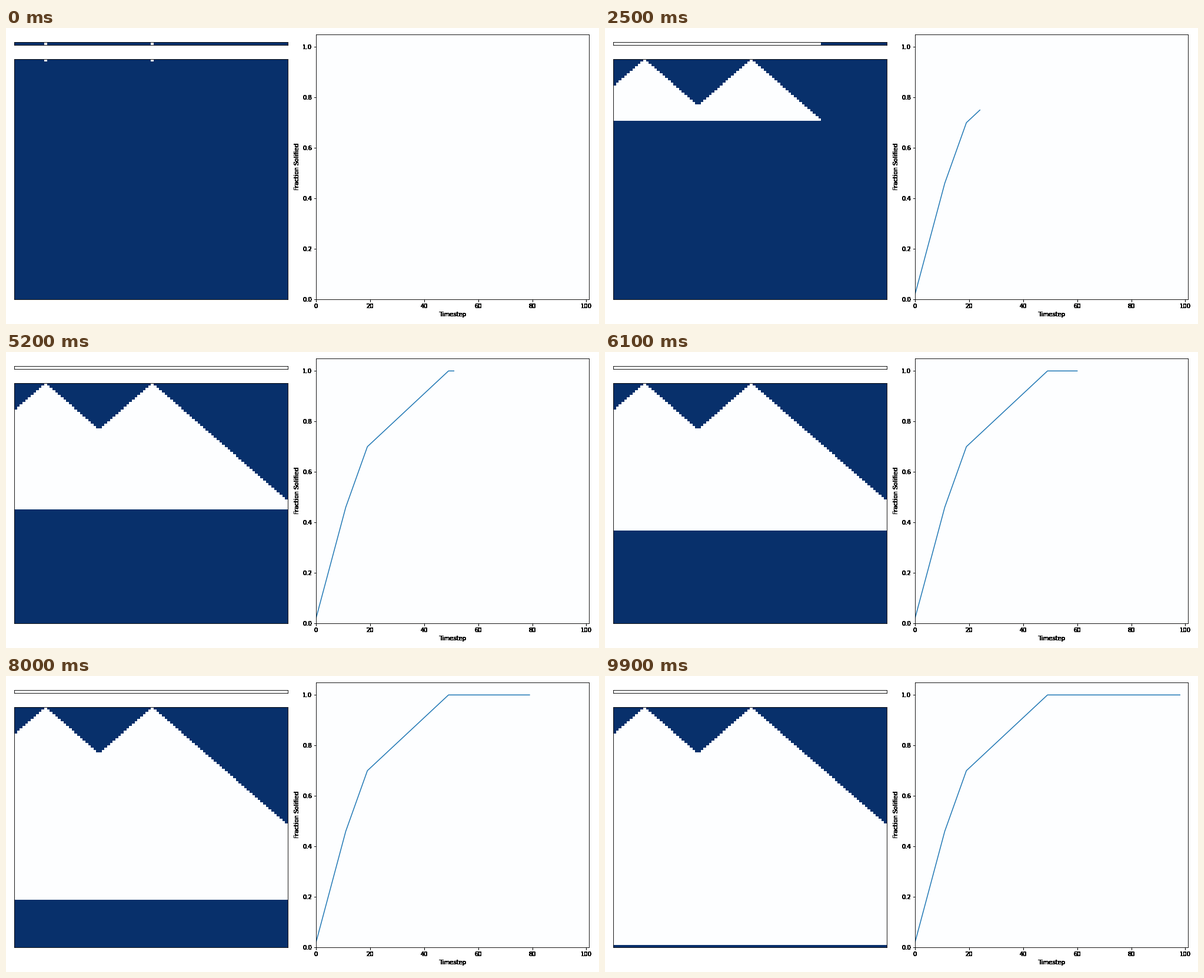
Animation, 1008 px wide and 504 px high, one loop 10 s. Source, as a matplotlib script:

```python
import numpy as np
import matplotlib.pyplot as plt
from matplotlib.animation import FuncAnimation
from matplotlib.colors import ListedColormap

W, H, DPI = 1008, 504, 72
CELLS, STEPS = 100, 101
SEEDS = (11, 50)
OVERDRAW = 40
SOLID, LIQUID = "#fdfeff", "#08306b"

plt.rcParams.update({
    "font.family": "DejaVu Sans",
    "font.size": 10,
    "axes.linewidth": 0.9,
    "axes.facecolor": SOLID,
    "toolbar": "None",
})

# Step at which each cell turns solid: distance to the nearest seed.
cells = np.arange(CELLS)
solid_at = np.min([np.abs(cells - s) for s in SEEDS], axis=0)
steps = np.arange(STEPS)
history = solid_at[None, :] > steps[:, None]
fraction = 1 - history.mean(axis=1)

fig = plt.figure(figsize=(W / DPI, H / DPI), dpi=DPI, facecolor="white")


def add_axes(left, top, right, bottom):
    """Axes placed by pixel edges measured from the top left."""
    return fig.add_axes([left / W, 1 - bottom / H,
                         (right - left) / W, (bottom - top) / H])


def add_grid(rows, *box):
    ax = add_axes(*box)
    ax.set_xticks([])
    ax.set_yticks([])
    return ax.imshow(np.ones((rows, CELLS)), cmap=ListedColormap([SOLID, LIQUID]),
                     vmin=0, vmax=1, aspect="auto", interpolation="nearest")


def harden(img, dpi):
    """Soft edges as they look after being drawn over many times."""
    out = img.copy()
    out[..., 3] = 1 - (1 - img[..., 3]) ** OVERDRAW
    return out, 0, 0


strip = add_grid(1, 14, 24, 479, 29)
field = add_grid(STEPS, 14, 53, 479, 462)

plot = add_axes(527, 10.8, 991, 462)
plot.set_xlim(0, 101)
plot.set_ylim(0, 1.05)
plot.set_xticks(range(0, 101, 20))
plot.set_yticks(np.linspace(0, 1, 6))
plot.set_xlabel("Timestep")
plot.set_ylabel("Fraction Solified")
plot.xaxis.set_agg_filter(harden)
plot.yaxis.set_agg_filter(harden)
curve, = plot.plot([], [], color="#1f77b4", lw=1.5)


def update(i):
    strip.set_data(history[i:i + 1])
    field.set_data(history | (steps[:, None] > i))
    curve.set_data(steps[:i], fraction[:i])
    return strip, field, curve


def init():
    return update(0)


anim = FuncAnimation(fig, update, frames=100, init_func=init,
                     interval=100, repeat=True, repeat_delay=0, blit=False)
plt.show()
```
